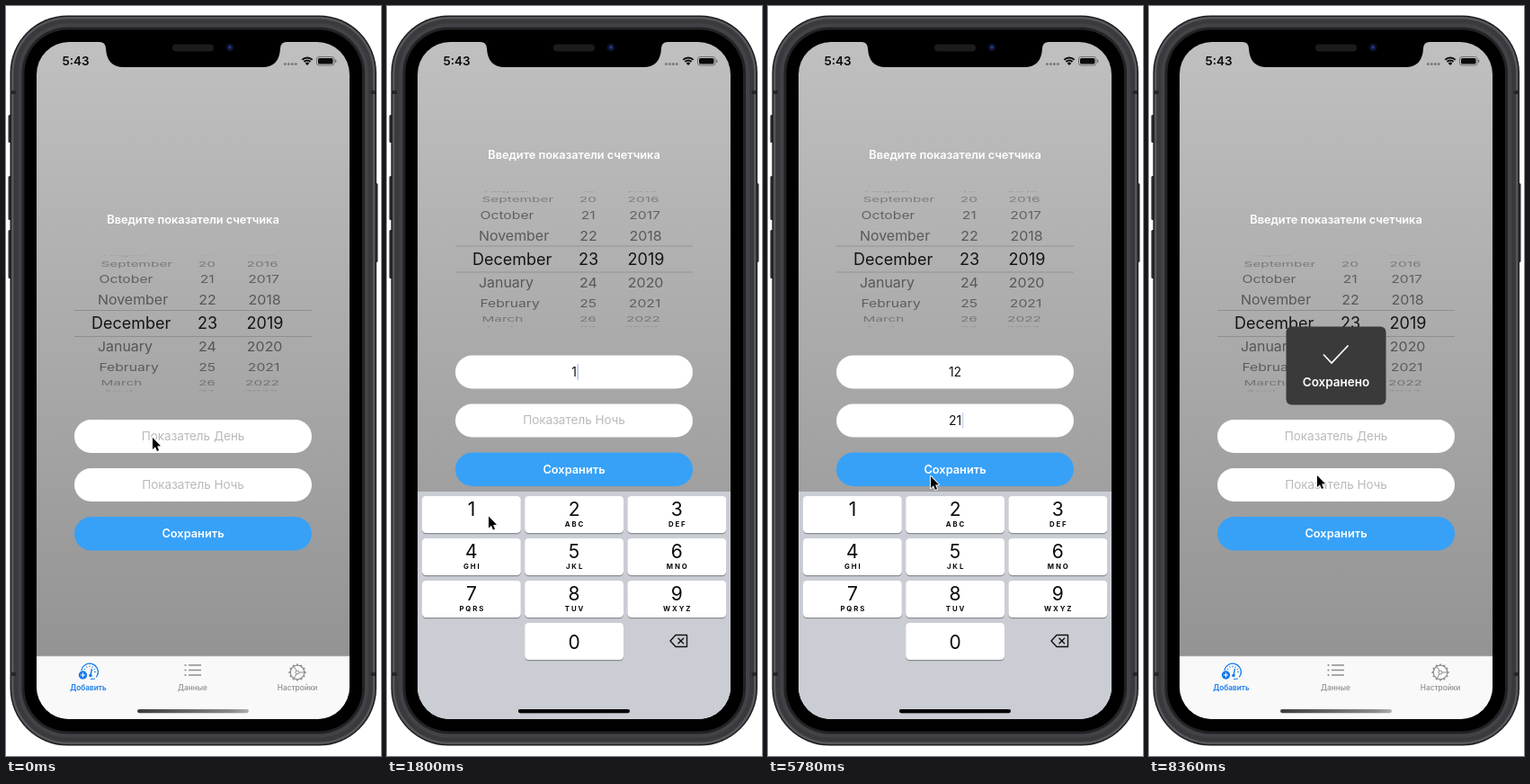
An HTML page with a canvas for the animation above (8380 ms loop, 417 by 834 pixels).

```html
<!DOCTYPE html>
<html lang="ru">
<head>
<meta charset="utf-8">
<title>Показатели счетчика</title>
<style>
  html, body { margin: 0; width: 100%; height: 100%; overflow: hidden; background: #fff; }
  canvas { display: block; width: 417px; height: 834px; }
</style>
</head>
<body>
<canvas id="stage"></canvas>
<script>
const W = 417, H = 834, LOOP = 8380, MID = 208;
const canvas = document.getElementById('stage');
const ctx = canvas.getContext('2d');
const dpr = window.devicePixelRatio || 1;
canvas.width = W * dpr;
canvas.height = H * dpr;

const KB_SHOW = 141, KB_HIDE = 6449, KB_LAG = 2, NIGHT_FOCUS = 3080;
const FORM_SHIFT = 71.5, KB_TOP = 540, SCREEN_BOTTOM = 793;
const MONTHS = ['August', 'September', 'October', 'November', 'December',
  'January', 'February', 'March', 'April'];
const LETTERS = ['', 'ABC', 'DEF', 'GHI', 'JKL', 'MNO', 'PQRS', 'TUV', 'WXYZ'];

// time, x, y of the pointer tip
const POINTER = [
  [0, 163, 480], [560, 163, 480], [940, 113, 567.5], [1880, 113, 567.5],
  [2250, 163, 566], [2520, 163, 566], [2960, 172, 458], [3180, 172, 458],
  [3800, 163, 565.5], [4300, 163, 565.5], [4640, 113, 566], [5060, 113, 566],
  [5640, 181, 523], [5850, 181, 523], [6200, 187, 522], [LOOP, 187, 522]
];
// time of release, digit
const PRESSES = [[1200, 1], [2400, 2], [4250, 2], [4900, 1]];
const CARET_RESETS = [KB_SHOW, 1200, 2400, NIGHT_FOCUS, 4250, 4900];

const clamp = v => Math.max(0, Math.min(1, v));
const ramp = (t, from, len) => clamp((t - from) / len);
const smooth = v => v * v * (3 - 2 * v);

function spring(ms) {
  if (ms <= 0) return 0;
  const x = ms * 0.01826;
  return 1 - (1 + x) * Math.exp(-x);
}

const liftAt = t => spring(t - KB_SHOW) * (1 - spring(t - KB_HIDE));

function rect(x, y, w, h, r, fill) {
  ctx.beginPath();
  ctx.roundRect(x, y, w, h, r);
  ctx.fillStyle = fill;
  ctx.fill();
}

function dot(x, y, r, fill) {
  ctx.beginPath();
  ctx.arc(x, y, r, 0, Math.PI * 2);
  ctx.fillStyle = fill;
  ctx.fill();
}

function stroke(points, color, width) {
  ctx.beginPath();
  points.forEach(([x, y], i) => i ? ctx.lineTo(x, y) : ctx.moveTo(x, y));
  ctx.strokeStyle = color;
  ctx.lineWidth = width;
  ctx.stroke();
}

function arc(x, y, r, from, to, color, width) {
  ctx.beginPath();
  ctx.arc(x, y, r, from, to);
  ctx.strokeStyle = color;
  ctx.lineWidth = width;
  ctx.stroke();
}

// y is the middle of the capitals
function text(str, x, y, size, weight, color, align = 'center', spacing = 0) {
  ctx.font = `${weight} ${size}px Inter, Roboto, sans-serif`;
  ctx.letterSpacing = spacing + 'px';
  ctx.textAlign = align;
  ctx.fillStyle = color;
  ctx.fillText(str, x + (align === 'center' ? spacing / 2 : 0), y + size * 0.36);
  const width = ctx.measureText(str).width;
  ctx.letterSpacing = '0px';
  return width;
}

function drawPhone() {
  for (const [y, h] of [[121, 31], [189, 49], [249, 54]]) rect(2.5, y, 5, h, 1.5, '#2e2e32');
  rect(408.5, 197, 5, 88, 1.5, '#2e2e32');
  const ring = (inset, color) =>
    rect(4.5 + inset, 10.5 + inset, 407.5 - 2 * inset, 812 - 2 * inset, 64 - inset, color);
  ring(0, '#1d1d20');
  ring(1.5, '#56565b');
  ring(4, '#3a3a3e');
  ring(9, '#434347');
  ring(13, '#232326');
  ring(16, '#000');
  for (const y of [94, 741]) {
    rect(5, y, 6, 4, 0, '#26262a');
    rect(405.5, y, 6, 4, 0, '#26262a');
  }
}

function drawNotch() {
  ctx.beginPath();
  ctx.moveTo(104, 39);
  ctx.lineTo(104, 40);
  ctx.quadraticCurveTo(110.5, 40, 111, 47);
  ctx.quadraticCurveTo(112, 68, 131, 68);
  ctx.lineTo(285, 68);
  ctx.quadraticCurveTo(304, 68, 305, 47);
  ctx.quadraticCurveTo(305.5, 40, 312, 40);
  ctx.lineTo(312, 39);
  ctx.fillStyle = '#000';
  ctx.fill();
  rect(185, 42.5, 46, 8, 4, '#1c1c1f');
  dot(249, 46, 4.5, '#0d1024');
  dot(249, 46, 2.3, '#182a66');
  dot(249, 45.6, 0.9, '#2f4a9c');
}

function drawStatus() {
  text('5:43', 77.5, 61, 13.5, 600, '#0b0b0b');
  for (let i = 0; i < 4; i++) dot(310.3 + i * 4, 64.5, 1.5, '#7b7b7b');
  const a = -Math.PI * 0.75, b = -Math.PI * 0.25;
  for (const r of [8, 5]) arc(335, 65.5, r, a, b, '#0b0b0b', 2);
  ctx.beginPath();
  ctx.moveTo(335, 66);
  ctx.arc(335, 66, 3.2, a, b);
  ctx.fillStyle = '#0b0b0b';
  ctx.fill();
  ctx.beginPath();
  ctx.roundRect(345.5, 56.5, 19.5, 9.5, 2.6);
  ctx.strokeStyle = 'rgba(0,0,0,.4)';
  ctx.lineWidth = 1;
  ctx.stroke();
  rect(347, 58, 16.5, 6.5, 1.5, '#0b0b0b');
  rect(366, 59.5, 1.3, 3.5, 0.7, 'rgba(0,0,0,.45)');
}

function drawPicker() {
  const y = 353, radius = 77.5, step = 19.6 * Math.PI / 180;
  const alphas = [0, 0.5, 0.46, 0.32, 0.2];
  ctx.save();
  ctx.beginPath();
  ctx.rect(76, y - 75.5, 264, 151);
  ctx.clip();
  for (let k = -4; k <= 4; k++) {
    const cos = Math.cos(k * step);
    const s = 1 / (1 + (1 - cos) * 0.08);
    const size = k ? 16 : 18;
    const color = k ? `rgba(0,0,0,${alphas[Math.abs(k)]})` : '#141414';
    ctx.save();
    ctx.translate(MID, y + radius * Math.sin(k * step));
    ctx.scale(s, s * cos);
    text(MONTHS[k + 4], k ? -106.5 : -113, 0, size, 400, color, 'left');
    text(String(23 + k), 16, 0, size, 400, color);
    text(String(2019 + k), 80, 0, size, 400, color);
    ctx.restore();
  }
  ctx.restore();
  for (const dy of [-15, 14]) rect(76, y + dy, 264, 1, 0, 'rgba(0,0,0,.17)');
}

function caretAlpha(t) {
  const last = CARET_RESETS.filter(e => e <= t).pop();
  const phase = (t - last) % 1000;
  if (phase < 500) return 1;
  if (phase < 650) return 1 - (phase - 500) / 150;
  return ramp(phase, 850, 150);
}

function drawField(y, value, hint, focused, t) {
  rect(76, y, 264, 37, 18.5, '#fff');
  const width = value
    ? text(value, MID, y + 18.5, 14, 400, '#111')
    : text(hint, MID, y + 18, 13.5, 400, '#bababe');
  if (!focused) return;
  ctx.globalAlpha = caretAlpha(t);
  const x = value ? MID + width / 2 + 0.5 : MID - width / 2 - 1.5;
  rect(x, y + 9.5, 1.8, 18, 0.8, '#2a5fd0');
  ctx.globalAlpha = 1;
}

function typed(t, from, to) {
  if (t >= KB_HIDE) return '';
  return PRESSES.filter(([at]) => at >= from && at < to && at <= t).map(p => p[1]).join('');
}

function drawHud(t) {
  const alpha = smooth(ramp(t, 6445, 320));
  if (!alpha) return;
  ctx.globalAlpha = alpha;
  rect(152.5, 356.5, 111, 87, 6, '#3a3a3a');
  stroke([[194, 387.5], [203, 397], [221.5, 377.5]], '#fff', 1.8);
  text('Сохранено', MID, 418, 13.5, 600, '#fff');
  ctx.globalAlpha = 1;
}

function drawForm(t) {
  ctx.save();
  ctx.translate(0, -FORM_SHIFT * liftAt(t));
  text('Введите показатели счетчика', MID, 237, 12.8, 600, '#fff');
  drawPicker();
  const open = t >= KB_SHOW && t < KB_HIDE;
  drawField(460, typed(t, 0, NIGHT_FOCUS), 'Показатель День', open && t < NIGHT_FOCUS, t);
  drawField(514, typed(t, NIGHT_FOCUS, KB_HIDE), 'Показатель Ночь', open && t >= NIGHT_FOCUS, t);
  rect(76, 568, 264, 37.5, 18.75, '#37a1f7');
  const label = t > 6340 ? 0.2 + 0.8 * ramp(t, 6440, 250) : 1;
  text('Сохранить', MID, 586.5, 12.8, 600, `rgba(255,255,255,${label})`);
  drawHud(t);
  ctx.restore();
}

function drawGauge(x, y, color) {
  arc(x, y, 9.3, Math.PI * 0.85, Math.PI * 2.22, color, 1.3);
  for (let i = 0; i < 7; i++) {
    const a = Math.PI * (1 + i / 6), c = Math.cos(a), s = Math.sin(a);
    stroke([[x + c * 5.3, y + s * 5.3], [x + c * 7, y + s * 7]], color, 1);
  }
  stroke([[x + 1, y + 4], [x + 2.5, y - 3.5]], color, 1.4);
  dot(x + 1, y + 4, 1.8, color);
  stroke([[x + 1, y + 8], [x + 6, y + 7.5]], color, 1.2);
  dot(x - 7.5, y + 3.5, 5.6, '#f9f9f9');
  dot(x - 7.5, y + 3.5, 4.7, color);
  stroke([[x - 10, y + 3.5], [x - 5, y + 3.5]], '#fff', 1.1);
  stroke([[x - 7.5, y + 1], [x - 7.5, y + 6]], '#fff', 1.1);
}

function drawGear(x, y, color) {
  arc(x, y, 7.8, 0, Math.PI * 2, color, 1.2);
  arc(x, y, 2, 0, Math.PI * 2, color, 1);
  for (let i = 0; i < 12; i++) {
    const a = Math.PI * i / 6, c = Math.cos(a), s = Math.sin(a);
    stroke([[x + c * 8, y + s * 8], [x + c * 9.6, y + s * 9.6]], color, 1.8);
  }
  for (let i = 0; i < 3; i++) {
    const a = Math.PI * 2 * i / 3, c = Math.cos(a), s = Math.sin(a);
    stroke([[x + c * 2, y + s * 2], [x + c * 7.4, y + s * 7.4]], color, 1);
  }
}

function drawTabs() {
  const gray = '#8e8e92', blue = '#167bea';
  rect(34, 723, 348, 70, 0, '#f9f9f9');
  rect(34, 722.5, 348, 0.8, 0, '#b4b4b4');
  drawGauge(93, 740.5, blue);
  for (const y of [733, 738.5, 744]) {
    dot(199.5, y, 1.1, gray);
    rect(203, y - 0.7, 14, 1.4, 0, gray);
  }
  drawGear(324, 741, gray);
  text('Добавить', 91.5, 758, 8.3, 600, blue);
  text('Данные', 207.5, 758, 8.3, 500, gray);
  text('Настройки', 324, 758, 8.3, 500, gray);
}

function drawKey(digit, col, row, t) {
  const x = 39 + col * 114.2, y = 545 + row * 47;
  const down = PRESSES.some(([at, d]) => d === digit && t >= at - 100 && t < at + 60);
  rect(x, y + 1, 109.8, 41.2, 4.2, '#8b8d92');
  rect(x, y, 109.8, 41, 4.2, down ? '#b4b9c3' : '#fff');
  const cx = x + 54.9;
  text(String(digit), cx, digit ? y + 14.5 : y + 21, 21, 400, '#0a0a0a');
  if (digit > 1) text(LETTERS[digit - 1], cx, y + 31.5, 7.8, 700, '#0a0a0a', 'center', 1.9);
}

function drawKeyboard(t) {
  const lift = liftAt(t - KB_LAG);
  if (lift < 0.002) return;
  ctx.save();
  ctx.translate(0, (SCREEN_BOTTOM - KB_TOP) * (1 - lift));
  rect(34, KB_TOP, 348, SCREEN_BOTTOM - KB_TOP + 1, 0, '#cacdd4');
  for (let d = 1; d <= 9; d++) drawKey(d, (d - 1) % 3, Math.floor((d - 1) / 3), t);
  drawKey(0, 1, 3, t);
  ctx.lineJoin = 'round';
  stroke([[315, 706], [321, 699.5], [333.5, 699.5], [333.5, 712.5], [321, 712.5],
    [315, 706], [321, 699.5]], '#111', 1.4);
  stroke([[323.5, 702.8], [330, 709.3]], '#111', 1.4);
  stroke([[330, 702.8], [323.5, 709.3]], '#111', 1.4);
  ctx.lineJoin = 'miter';
  ctx.restore();
}

function drawHomeBar(t) {
  const g = ctx.createLinearGradient(146, 0, 270, 0);
  g.addColorStop(0, '#3c3c3c');
  g.addColorStop(0.5, '#6a6a6a');
  g.addColorStop(0.85, '#8a8a8a');
  g.addColorStop(1, '#b0b0b0');
  rect(146, 782, 124, 4.2, 2.1, g);
  ctx.globalAlpha = ramp(t, 1100, 300) * (1 - ramp(t, 6400, 100));
  rect(146, 782, 124, 4.2, 2.1, '#000');
  ctx.globalAlpha = 1;
}

function drawPointer(t) {
  const i = POINTER.findIndex(p => p[0] > t);
  const [t0, x0, y0] = POINTER[i - 1], [t1, x1, y1] = POINTER[i];
  const k = smooth((t - t0) / (t1 - t0));
  ctx.save();
  ctx.translate(x0 + (x1 - x0) * k, y0 + (y1 - y0) * k);
  ctx.beginPath();
  for (const [x, y] of [[0, 0], [0, 13], [3, 10.3], [5, 15], [7, 14.1],
    [5.1, 9.6], [9, 9.3]]) ctx.lineTo(x, y);
  ctx.closePath();
  ctx.lineJoin = 'round';
  ctx.lineWidth = 1.8;
  ctx.strokeStyle = '#fff';
  ctx.stroke();
  ctx.fillStyle = '#000';
  ctx.fill();
  ctx.restore();
}

function draw(t) {
  ctx.setTransform(dpr, 0, 0, dpr, 0, 0);
  ctx.fillStyle = '#fff';
  ctx.fillRect(0, 0, W, H);
  drawPhone();
  ctx.save();
  ctx.beginPath();
  ctx.roundRect(34, 40, 348, 753, 36);
  ctx.clip();
  const bg = ctx.createLinearGradient(0, 40, 0, SCREEN_BOTTOM);
  bg.addColorStop(0, '#c0c0c0');
  bg.addColorStop(1, '#8f8f8f');
  ctx.fillStyle = bg;
  ctx.fillRect(34, 40, 348, 753);
  drawForm(t);
  drawTabs();
  drawKeyboard(t);
  drawHomeBar(t);
  drawStatus();
  ctx.restore();
  drawNotch();
  drawPointer(t);
}

const start = performance.now();
function tick() {
  draw((performance.now() - start) % LOOP);
  requestAnimationFrame(tick);
}
tick();
</script>
</body>
</html>
```
